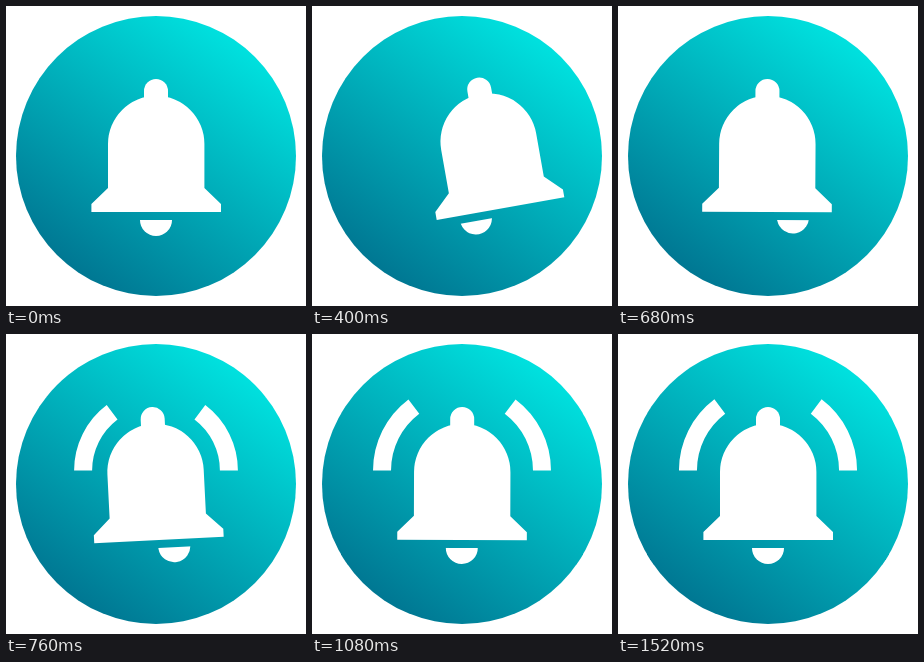
Recreate the animation shown at these times as an HTML page. Size 300x300 px, loop 2.28 s.

```html
<!DOCTYPE html>
<html>
<head>
<meta charset="utf-8">
<title>Ringing bell</title>
<style>
  html, body { margin: 0; height: 100%; overflow: hidden; background: #fff; }
  svg { display: block; width: 100vw; height: 100vh; }
</style>
</head>
<body>
<svg viewBox="0 0 300 300">
  <defs>
    <linearGradient id="teal" gradientUnits="userSpaceOnUse" x1="70" y1="262" x2="230" y2="38">
      <stop offset="0" stop-color="#007893"/>
      <stop offset="1" stop-color="#00e0de"/>
    </linearGradient>
    <clipPath id="below"><path d="M0 214H300V300H0z"/></clipPath>
  </defs>
  <circle cx="150" cy="150" r="140" fill="url(#teal)"/>
  <path id="waves" transform="translate(150 136.5)" fill="none" stroke="#fff" stroke-width="18"/>
  <g id="bell" fill="#fff">
    <path d="M138 95V85a12 12 0 0 1 24 0V95z"/>
    <path d="M102 138a48 48 0 0 1 96.4 0V182L215 198V206H85.4V198L102 182z"/>
    <g clip-path="url(#below)"><circle id="clapper" cx="150" cy="214" r="16"/></g>
  </g>
</svg>
<script>
const LOOP = 2280, STEP = 40;
const [waves, bell, clapper] = ["waves", "bell", "clapper"].map(id => document.getElementById(id));

// Eases from one value to another between two times.
function ease(t, from, to, start, end) {
  const u = Math.min(1, Math.max(0, (t - start) / (end - start)));
  return from + (to - from) * u * u * (3 - 2 * u);
}

// Swings right, then left, then back to the middle.
function sway(t, right, left, [start, rightAt, leftAt, end]) {
  if (t < rightAt) return ease(t, 0, right, start, rightAt);
  if (t < leftAt) return ease(t, right, left, rightAt, leftAt);
  return ease(t, left, 0, leftAt, end);
}

// Three half swings of a fading oscillation.
function wobble(t, amount, half, decay) {
  if (t < 0 || t > 3 * half) return 0;
  return amount * Math.exp(-t / decay) * Math.sin(Math.PI * t / half);
}

function wavePath(radius) {
  const x = radius * 0.602, y = radius * 0.799;
  const arc = (side, sweep) =>
    `M${side * radius} 0A${radius} ${radius} 0 0 ${sweep} ${side * x} ${-y}`;
  return arc(-1, 1) + arc(1, 0);
}

function draw(now) {
  const t = Math.floor(now % LOOP / STEP) * STEP;

  const swing = sway(t, -10.3, 8.3, [160, 390, 530, 700]);
  const settle = wobble(t - 700, -8.7, 300, 105);
  bell.setAttribute("transform", `rotate(${swing} 150 -14) rotate(${settle} 150 151)`);

  // The clapper hangs from the knob and trails the bell.
  const lag = sway(t, 11.5, -14.8, [200, 400, 580, 920]) + wobble(t - 880, 6.6, 200, 485);
  clapper.setAttribute("transform", `rotate(${lag} 150 85)`);

  waves.setAttribute("d", wavePath(ease(t, 0, 80, 680, 778) + wobble(t - 778, 8, 300, 150)));
}

const start = performance.now();
function tick() {
  draw(performance.now() - start);
  requestAnimationFrame(tick);
}
tick();
</script>
</body>
</html>
```
